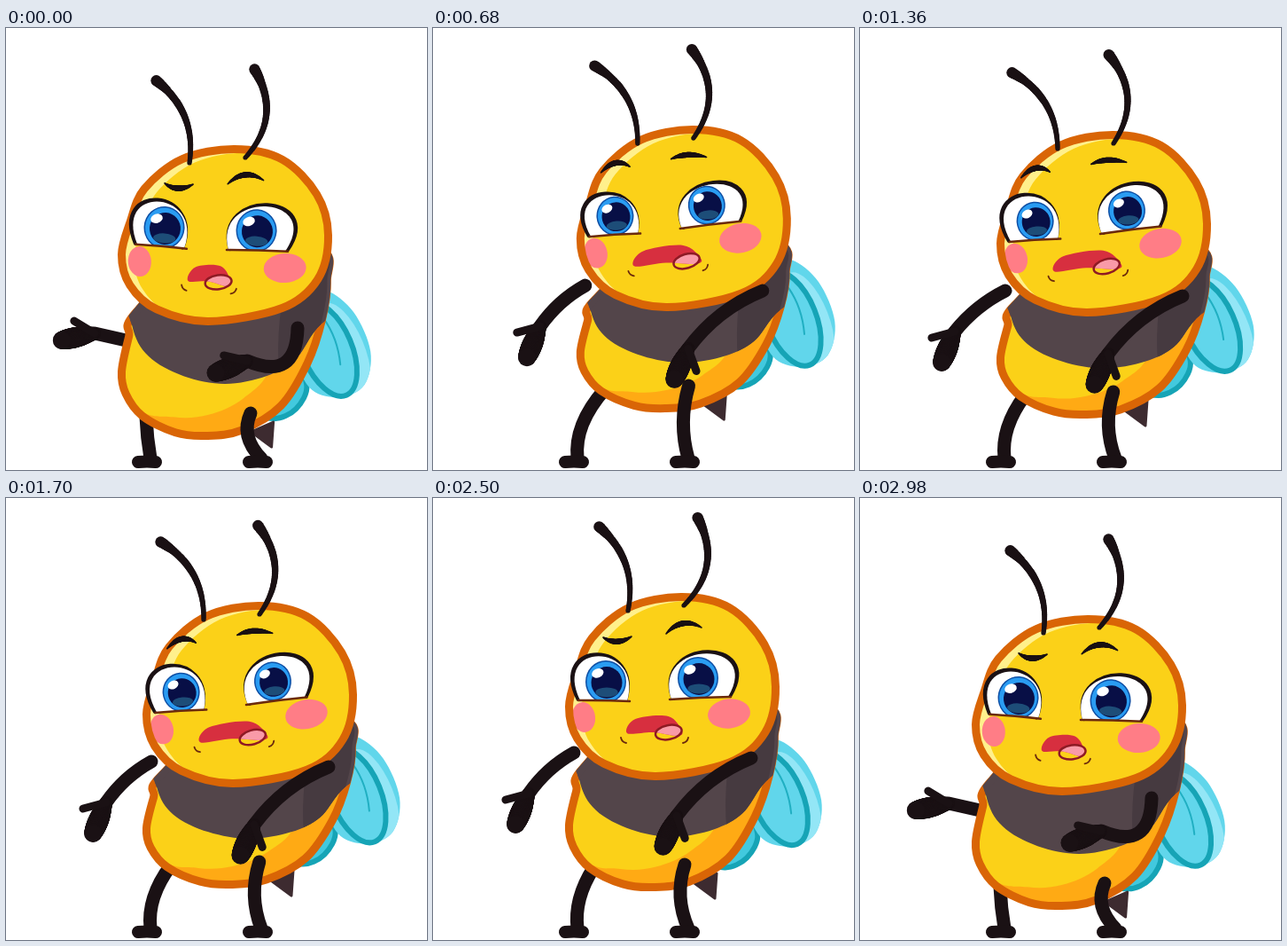
An HTML page with a canvas for the animation above (3 s loop, 475 by 498 pixels).

```html
<!DOCTYPE html>
<html lang="en">
<head>
<meta charset="utf-8">
<title>Bee</title>
<style>
html, body { margin: 0; width: 100%; height: 100%; overflow: hidden; background: #fff; }
canvas { display: block; }
</style>
</head>
<body>
<canvas id="stage" width="475" height="498"></canvas>
<script>
const c = document.getElementById('stage').getContext('2d');
const LOOP = 3000, WIDTH = 242, RAD = Math.PI / 180;
const INK = '#1a1114', BROWN = '#6b2a0c', ORANGE = '#d96506', YELLOW = '#fbd118', TEAL = '#16a4b6';

// x, y, h: head box; base: lowest point of the body; fx, fy, tilt: face shift and turn;
// droop, shrug, reach: arms; sway: antennae; worry, mouth, open: expression
const sass = { x: 126, y: 132, h: 203, base: 464, fx: 5, fy: -3, tilt: 4, droop: 0, shrug: 0,
  reach: 0, sway: -22, worry: 0, mouth: 24, open: 1 };
const wince = { ...sass, x: 133, y: 127, h: 208, base: 454, fx: 1, fy: -4, tilt: -1, shrug: 1,
  sway: -63, worry: .9, mouth: 28, open: .13 };
const plea = { x: 154, y: 117, h: 209, base: 440, fx: -1, fy: -3, tilt: -4.5, droop: 1, shrug: 0,
  reach: 0, sway: -29, worry: 1, mouth: 38, open: 1 };
const doubt = { ...plea, x: 149, y: 107, h: 211, base: 443, fx: 0, fy: 0, tilt: 0,
  sway: -19, worry: 0, mouth: 31 };
const leap = { ...plea, x: 179, y: 95, base: 418, open: .7 };
const drift = { ...plea, y: 116, reach: 6, sway: -31 };
const rise = { ...doubt, x: 161, y: 94, base: 430 };
const thrust = { ...sass, y: 134, base: 466, reach: 8 };

const KEYS = [
  [0, sass], [90, sass], [330, wince], [420, wince], [548, leap], [760, plea], [1040, plea],
  [1360, drift], [1680, plea], [2220, plea], [2410, rise], [2500, doubt], [2690, thrust],
  [2960, sass], [LOOP, sass]
];

const mix = (a, b, u) => a + (b - a) * u;

function poseAt(t) {
  let i = 0;
  while (t >= KEYS[i + 1][0]) i++;
  const [t0, a] = KEYS[i], [t1, b] = KEYS[i + 1];
  const u = (t - t0) / (t1 - t0), pose = {};
  for (const k in a) pose[k] = mix(a[k], b[k], u * u * (3 - 2 * u));
  return pose;
}

function fill(color) { c.fillStyle = color; c.fill(); }
function stroke(color, w) { c.strokeStyle = color; c.lineWidth = w; c.stroke(); }
function within(draw) { c.save(); c.clip(); draw(); c.restore(); }

// Closed smooth curve through points
function loop(p) {
  const n = p.length / 2, at = i => { const j = (i + n) % n * 2; return [p[j], p[j + 1]]; };
  c.beginPath();
  c.moveTo(p[0], p[1]);
  for (let i = 0; i < n; i++) {
    const [a, b, d, e] = [at(i - 1), at(i), at(i + 1), at(i + 2)];
    c.bezierCurveTo(b[0] + (d[0] - a[0]) / 6, b[1] + (d[1] - a[1]) / 6,
      d[0] - (e[0] - b[0]) / 6, d[1] - (e[1] - b[1]) / 6, d[0], d[1]);
  }
  c.closePath();
}
function oval(x, y, rx, ry, color, turn = 0) {
  c.beginPath();
  c.ellipse(x, y, rx, ry, turn, 0, 7);
  fill(color);
}
function curve(x0, y0, x1, y1, x2, y2, color, w) {
  c.beginPath();
  c.moveTo(x0, y0);
  c.quadraticCurveTo(x1, y1, x2, y2);
  stroke(color, w);
}
function taper(x0, y0, x1, y1, x2, y2, radius) {
  for (let t = 0; t <= 1; t += 1 / 64) {
    const r = radius(t);
    oval(mix(mix(x0, x1, t), mix(x1, x2, t), t), mix(mix(y0, y1, t), mix(y1, y2, t), t), r, r, INK);
  }
}

const fit = (unit, x, y, w, h) => unit.map((v, i) => i % 2 ? y + v * h : x + v * w);
const HEAD = [.546, 0, .777, .06, .945, .263, 1, .5, .95, .755, .777, .923, .42, 1,
  .17, .93, .04, .79, 0, .612, .042, .42, .11, .23, .294, .057];
const BODY = [.07, -.12, .035, .1, 0, .42, .02, .62, .1, .82, .26, .97, .41, 1, .58, .95, .77, .73,
  .9, .34, .97, -.05, .995, -.4, .96, -.7, .5, -.9];
const STRIPE = [.03, -.5, .05, 0, .13, .28, .3, .46, .5, .53, .7, .46, .84, .31, .94, .04, 1.1, -.3, 1.1, -1, .5, -1.2];

function drawWings(p, t) {
  c.save();
  c.translate(372 + (p.x - 154) * 1.17, 345 + (p.base - 440) * 1.13);
  c.rotate(.025 * Math.sin(t * Math.PI / 250));
  loop([-20, 0, 0, 30, -12, 57, -37, 68, -60, 55]);
  fill('#42c9de');
  stroke(TEAL, 6);
  loop([6, -65, 23, -76, 53, -52, 72, -8, 65, 30, 36, 44, 3, 33, -12, -10]);
  fill('#61d6eb');
  within(() => {
    oval(42, -10, 23, 56, '#93e6f6', -.4);
    oval(23, -10, 28, 56, '#61d6eb', -.4);
  });
  stroke(TEAL, 6);
  curve(19, -45, 35, -23, 38, 7, '#20afc2', 2);
  c.restore();
}

function drawSting(p) {
  c.beginPath();
  for (const [x, y] of [[299, -9], [322, 8], [324, -20]])
    c.lineTo(x + (p.x - 154) * .8, 440 + y + (p.base - 440));
  c.closePath();
  fill('#3d2b30');
  stroke('#3d2b30', 3);
}

function drawLeg(hx, hy, knee, foot) {
  curve(hx, hy, knee, (hy + 486) / 2, foot, 485, INK, 15);
  curve(foot - 14, 489, foot - 4, 488, foot + 6, 489, INK, 14);
}

// Shoulder and wrist from the head corner, then palm angle, thumb angle and elbow bend
const ARMS = {
  left: { up: [14, 221, -26, 212, 168, 211, 0], down: [10, 180, -41, 226, 113, 165, -8] },
  right: { up: [203, 206, 146, 243, 159, 193, 50], down: [210, 186, 126, 251, 114, 70, -15] }
};
function drawArm(p, { up, down }, reach) {
  const [sx, sy, wx, wy, palm, thumb, bend] = up.map((v, i) => mix(v, down[i], p.droop));
  const dx = wx - sx - reach, dy = wy - sy, len = Math.hypot(dx, dy);
  c.save();
  c.translate(p.x + sx, p.y + sy);
  curve(0, 0, dx / 2 + dy / len * bend, dy / 2 - dx / len * bend, dx, dy, INK, 15);
  c.translate(dx, dy);
  const a = (palm + p.shrug * 42) * RAD, b = (thumb + p.shrug * 70) * RAD;
  const px = 38 * Math.cos(a), py = 38 * Math.sin(a);
  taper(0, 0, px / 2, py / 2, px, py, u => 7 + 4.5 * Math.sin(u * 2.4));
  curve(0, 0, 0, 0, 27 * Math.cos(b), 27 * Math.sin(b), INK, 9);
  c.restore();
}

function drawBody(p) {
  const top = p.y + p.h, box = [p.x + 4.5, top, WIDTH - 9, p.base - top - 4.5];
  const shape = fit(BODY, ...box);
  loop(shape);
  fill('#ffaa14');
  within(() => {
    loop(fit([-.2, 0, .06, .72, .25, .83, .42, .81, .59, .66, .72, .36, .7, -.3], ...box));
    fill(YELLOW);
  });
  loop(shape);
  stroke(ORANGE, 9);
  loop(fit(STRIPE, ...box));
  within(() => {
    loop(shape);
    fill('#53454a');
    stroke('#53454a', 8);
    within(() => oval(box[0] + WIDTH, top, 64, 150, '#463a40', .1));
  });
}

// Runs a drawing in the coordinates of the face
function onFace(p, draw) {
  c.save();
  c.translate(p.x + p.fx + 105, p.y + p.fy + 120);
  c.rotate(p.tilt * RAD);
  c.translate(-105, -120);
  draw();
  c.restore();
}

function drawHead(p) {
  const box = [p.x + 4.5, p.y + 4.5, WIDTH - 9, p.h - 9];
  loop(fit(HEAD, ...box));
  fill('#fff08c');
  within(() => {
    loop(fit(HEAD, box[0] + 14, box[1] + 4, box[2], box[3]));
    fill(YELLOW);
    onFace(p, () => {
      oval(21, 140, 13, 17, '#ff7d86', -.15);
      oval(185, 136, 24, 16.5, '#ff7d86', -.12);
    });
  });
  loop(fit(HEAD, ...box));
  stroke(ORANGE, 9);
}

function drawEye(x0, y0, x1, y1, ix, iy, side, p) {
  const w = x1 - x0, h = 50 * p.open, r = 23 - 2 * p.worry, isOpen = p.open > .25;
  const dome = (dx, dy) => {
    const outer = .62 * w * p.open, inner = .36 * w * p.open;
    c.beginPath();
    c.moveTo(x0 + dx, y0 + dy);
    c.bezierCurveTo(x0 + dx - (side < 0 ? outer : inner), y0 + dy - 1.34 * h,
      x1 + dx + (side < 0 ? inner : outer), y1 + dy - 1.34 * h, x1 + dx, y1 + dy);
  };
  dome(side * 2, -1.5);
  fill(INK);
  stroke(INK, 5);
  dome(0, 0);
  fill(isOpen ? '#fff' : YELLOW);
  if (isOpen) within(() => {
    oval(ix, iy, r, r + 1, '#0e4fa5');
    oval(ix, iy, r - 1.5, r - .5, '#2a9cf2');
    oval(ix + 1, iy + 1, r * .76, r * .78, '#080f46');
    oval(ix + 1, iy + r * .52, r * .55, r * .24, '#1d4d78');
    oval(ix - r * .4, iy - r * .42, r * .3, r * .22, '#fff', -.4);
  });
  curve(x0 - 2, y0, (x0 + x1) / 2, (y0 + y1) / 2 + (isOpen ? -1 : 6), x1 + 3, y1, BROWN, 2.5);
  c.globalAlpha = Math.max(0, 1 - p.open * 2);
  curve(x0 + 13, y0 - 45, x0 - 6, y0 - 25, x0 + 2, y0 - 4, BROWN, 2.2);
  c.globalAlpha = 1;
}

function drawBrows(w) {
  const weight = u => .8 + 2.3 * Math.sin(Math.PI * u);
  taper(43 - 9 * w, 50, 58 - 6 * w, 60 - 27 * w, 75 - 8 * w, 49 - 3 * w, weight);
  taper(114, 46 - 5 * w, 132, 26 + 8 * w, 154, 39 + 3 * w, weight);
}

function drawMouth(w) {
  loop(fit([-1, 9, -.7, -7, .5, -10, 1, 7, .8, 12, -.05, 8], 101, 149, w, 1));
  fill('#d72f3f');
  within(() => oval(92 + w * .8, 157, 15, 8, '#f99aa8', -.2));
  stroke('#8e1a24', 2.5);
  for (const s of [-1, 1]) {
    const x = 101 + s * (w + 7);
    curve(x, 163, x - s, 168, x - s * 6, 169, BROWN, 1.8);
  }
}

function drawAntenna(p, rootX, rootY, angle, bulge) {
  const s = Math.sin(angle * RAD), k = Math.cos(angle * RAD);
  const x = p.x + rootX + 2 * p.fx, y = p.y + rootY;
  taper(x + 100 * s, y - 100 * k, x + 50 * s + bulge * k, y - 50 * k + bulge * s, x, y,
    u => 2.6 + 2.2 * (1 - u) + 1.4 * Math.max(0, 1 - u * 6));
}

function draw(t) {
  const p = poseAt(t);
  c.fillStyle = '#fff';
  c.fillRect(0, 0, 475, 498);
  c.lineCap = c.lineJoin = 'round';
  drawWings(p, t);
  drawSting(p);
  drawLeg(p.x + 32, p.base - 26, 159, 163);
  drawArm(p, ARMS.left, p.reach);
  drawBody(p);
  const hip = 276 + (p.x - 126) * .35;
  drawLeg(hip, p.base - 30, hip - 12, 288);
  drawHead(p);
  drawArm(p, ARMS.right, 0);
  drawAntenna(p, 71, 20, p.sway, 29);
  drawAntenna(p, 134, 14, p.sway + 28, 37);
  onFace(p, () => {
    drawEye(17, 121, 70, 122, 46, 100, -1, p);
    drawEye(120, 120, 184, 117, 150, 96, 1, p);
    drawBrows(p.worry);
    drawMouth(p.mouth);
  });
}

const start = performance.now();
function tick() {
  draw((performance.now() - start) % LOOP);
  requestAnimationFrame(tick);
}
tick();
</script>
</body>
</html>
```
